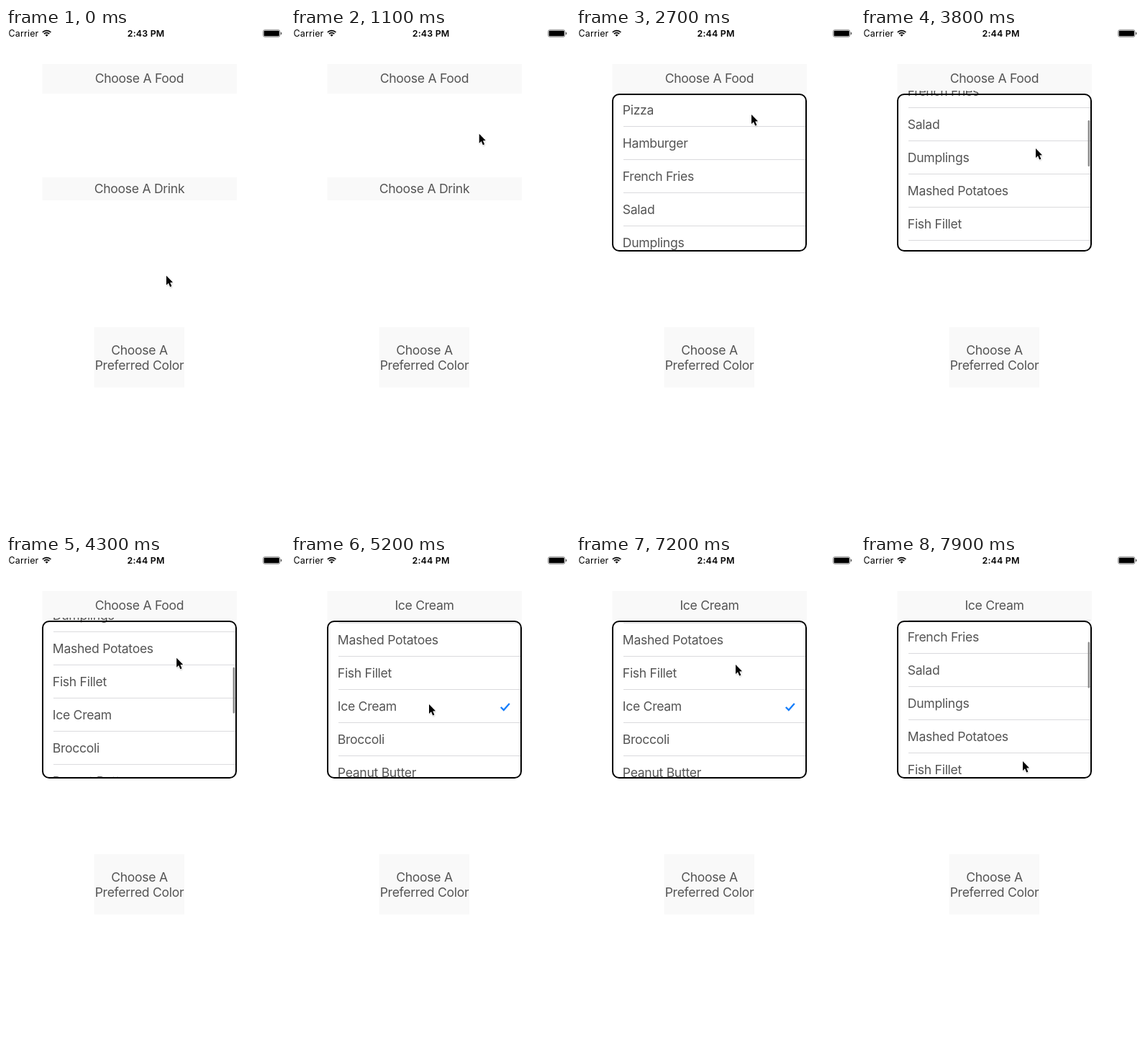
These frames come from a looping animation (388 by 692 pixels, 8000 ms). An HTML page:

```html
<!DOCTYPE html>
<html lang="en">
<head>
<meta charset="utf-8">
<title>Drop-down menus</title>
<style>
  html, body { margin: 0; width: 100%; height: 100%; overflow: hidden; background: #fff; }
  svg { display: block; width: 100vw; height: 100vh; }
  text { font-family: Inter, Roboto, sans-serif; white-space: pre; }
  .label { font-size: 17.6px; letter-spacing: -0.3px; fill: #545454; }
  .mid { text-anchor: middle; }
  .status { font-size: 12.4px; letter-spacing: 0.2px; fill: #000; }
  .button { fill: #f9f9f9; }
</style>
</head>
<body>
<svg viewBox="0 0 388 692">
  <defs>
    <clipPath id="clip"><rect id="clipBox" x="52" y="87" width="267.5" height="0"/></clipPath>
    <filter id="soft" x="-50%" y="-50%" width="200%" height="200%"><feGaussianBlur stdDeviation="1"/></filter>
  </defs>

  <text class="status" x="3.5" y="12">Carrier</text>
  <g fill="none" stroke="#000" stroke-width="1.7">
    <path d="M50.8 6A8.2 8.2 0 0 1 62.4 6M52.9 8.1A5.2 5.2 0 0 1 60.3 8.1"/>
    <path d="M56.6 11.8L54.55 9.75A2.9 2.9 0 0 1 58.65 9.75Z" fill="#000" stroke="none"/>
  </g>
  <text class="status mid" id="clock" x="194.6" y="12" font-weight="600"></text>
  <rect x="357.7" y="2.7" width="23.2" height="9.6" rx="2" fill="#fff" stroke="#777" stroke-width="0.9"/>
  <rect x="358.7" y="3.7" width="21.2" height="7.6" rx="1" fill="#000"/>
  <path d="M382 5.6Q383.4 6 383.4 7.5T382 9.4Z" fill="#444"/>

  <rect class="button" x="50.5" y="50" width="270.5" height="41"/>
  <rect class="button" x="50.5" y="207" width="270.5" height="32"/>
  <rect class="button" x="122.5" y="415" width="125.5" height="83.5"/>
  <text class="label mid" id="title" x="185.5" y="76.3"></text>
  <text class="label mid" x="185.5" y="229">Choose A Drink</text>
  <text class="label mid" x="185.5" y="453">Choose A</text>
  <text class="label mid" x="185.5" y="474">Preferred Color</text>

  <g id="menu">
    <rect id="sheet" fill="#fff"/>
    <g clip-path="url(#clip)">
      <g id="rows"></g>
      <rect id="bar" x="315.6" width="2.6" height="64" rx="1.3" fill="#8c8c8c"/>
    </g>
    <rect id="frame" fill="none" stroke="#000" stroke-width="2"/>
  </g>

  <g id="pointer">
    <path d="M0 0V13L3 10.2L5.2 15.4L7.4 14.4L5.2 9.4L9 9.2Z" transform="translate(0.6 1.6)" fill="#000" opacity="0.3" filter="url(#soft)"/>
    <path d="M0 0V13L3 10.2L5.2 15.4L7.4 14.4L5.2 9.4L9 9.2Z" fill="#000" stroke="#fff" stroke-width="1.6" paint-order="stroke"/>
  </g>
</svg>

<script>
const LOOP = 8000, STEP = 100, ROW = 46, TOP = 91, FULL = 217;
const FOODS = ['Pizza', 'Hamburger', 'French Fries', 'Salad', 'Dumplings',
  'Mashed Potatoes', 'Fish Fillet', 'Ice Cream', 'Broccoli', 'Peanut Butter'];
const PICK = 'Ice Cream';

// time, x, y of the pointer tip
const PATH = [
  [0, 223, 343.5], [300, 223, 343.5], [800, 250, 230], [1200, 263, 129],
  [1700, 252, 92], [2100, 245, 78], [2300, 245, 78], [2700, 244, 120],
  [3050, 244, 285], [3800, 243, 167], [3900, 243, 147], [4100, 242, 135],
  [4800, 210, 191], [5000, 192, 207], [5400, 192, 207], [6000, 207, 112],
  [6200, 212, 95.5], [6500, 214, 80], [6700, 214, 80], [7200, 222, 152],
  [7900, 225, 286]
];
const DRAG1 = 3050, RELEASE = 3900, DRAG2 = 7200, REST = 226;

const $ = id => document.getElementById(id);
const clamp = v => Math.max(0, Math.min(1, v));
const ramp = (t, from, to) => clamp((t - from) / (to - from));
const ease = p => p * p * (3 - 2 * p);
const set = (node, attrs) => {
  for (const key in attrs) node.setAttribute(key, attrs[key]);
};

$('rows').innerHTML = FOODS.map((name, i) => {
  const y = TOP + i * ROW;
  const check = name === PICK
    ? `<path id="check" d="M291.8 ${y + 24}l4 4l8 -9" fill="none" stroke="#157efb" stroke-width="2.3"/>` : '';
  return `<text class="label" x="64.8" y="${y + 29}">${name}</text>` +
    `<rect x="66" y="${y + 45}" width="254" height="1" fill="#dadadd"/>${check}`;
}).join('');

function slope(i, k) {
  const a = PATH[i - 1], b = PATH[i], c = PATH[i + 1];
  if (!a || !c) return 0;
  const l = (b[k] - a[k]) / (b[0] - a[0]);
  const r = (c[k] - b[k]) / (c[0] - b[0]);
  return l * r > 0 ? 2 * l * r / (l + r) : 0;
}

function pointerAt(t, k) {
  const last = PATH[PATH.length - 1];
  if (t >= last[0]) return last[k];
  const i = PATH.findIndex(p => p[0] > t) - 1;
  const a = PATH[i], b = PATH[i + 1];
  const span = b[0] - a[0], u = (t - a[0]) / span, v = 1 - u;
  return a[k] * (1 + 2 * u) * v * v + b[k] * u * u * (3 - 2 * u) +
    span * u * v * (slope(i, k) * v - slope(i + 1, k) * u);
}

function scrollAt(t) {
  const moved = (now, start) => pointerAt(now, 2) - pointerAt(start, 2);
  if (t < DRAG1) return 0;
  if (t < RELEASE) return -moved(t, DRAG1);
  if (t < 4700) {
    const left = REST + moved(RELEASE, DRAG1);
    return REST - left * Math.exp((RELEASE - t) / 200);
  }
  return t < DRAG2 ? REST : REST - moved(t, DRAG2);
}

function heightAt(t) {
  if (t < 2200 || t >= 5600 && t < 6700) return 0;
  const open = t < 5200 ? ramp(t, 2200, 2600)
    : t < 5600 ? 1 - ramp(t, 5200, 5600)
    : ramp(t, 6700, 7100);
  return 0.3 + (FULL - 0.3) * ease(open);
}

function draw(t) {
  const picked = t >= 5200;
  $('clock').textContent = t < 1700 ? '2:43 PM' : '2:44 PM';
  $('title').textContent = picked ? PICK : 'Choose A Food';
  set($('check'), { opacity: picked ? 1 : 0 });

  const h = heightAt(t), scroll = scrollAt(t);
  set($('menu'), { visibility: h ? 'visible' : 'hidden' });
  const inset = 6 * clamp(1 - h / 20);
  const box = { x: 51 + inset, y: TOP + 1, width: 269 - 2 * inset, height: h,
    rx: 9, ry: Math.min(9, h / 2) };
  set($('sheet'), box);
  set($('frame'), box);
  set($('clipBox'), { height: h > 4 ? h + 5 : 0 });
  set($('rows'), { transform: `translate(0 ${-scroll})` });

  const shown = t < 6000 ? ramp(t, 3050, 3200) * (1 - ramp(t, 4600, 4800)) : ramp(t, 7200, 7350);
  set($('bar'), { y: 94 + scroll * 0.288, opacity: shown });
  set($('pointer'), { transform: `translate(${pointerAt(t, 1)} ${pointerAt(t, 2)})` });
}

const start = performance.now();
function tick() {
  const t = (performance.now() - start) % LOOP;
  draw(Math.floor(t / STEP) * STEP);
  requestAnimationFrame(tick);
}
tick();
</script>
</body>
</html>
```
